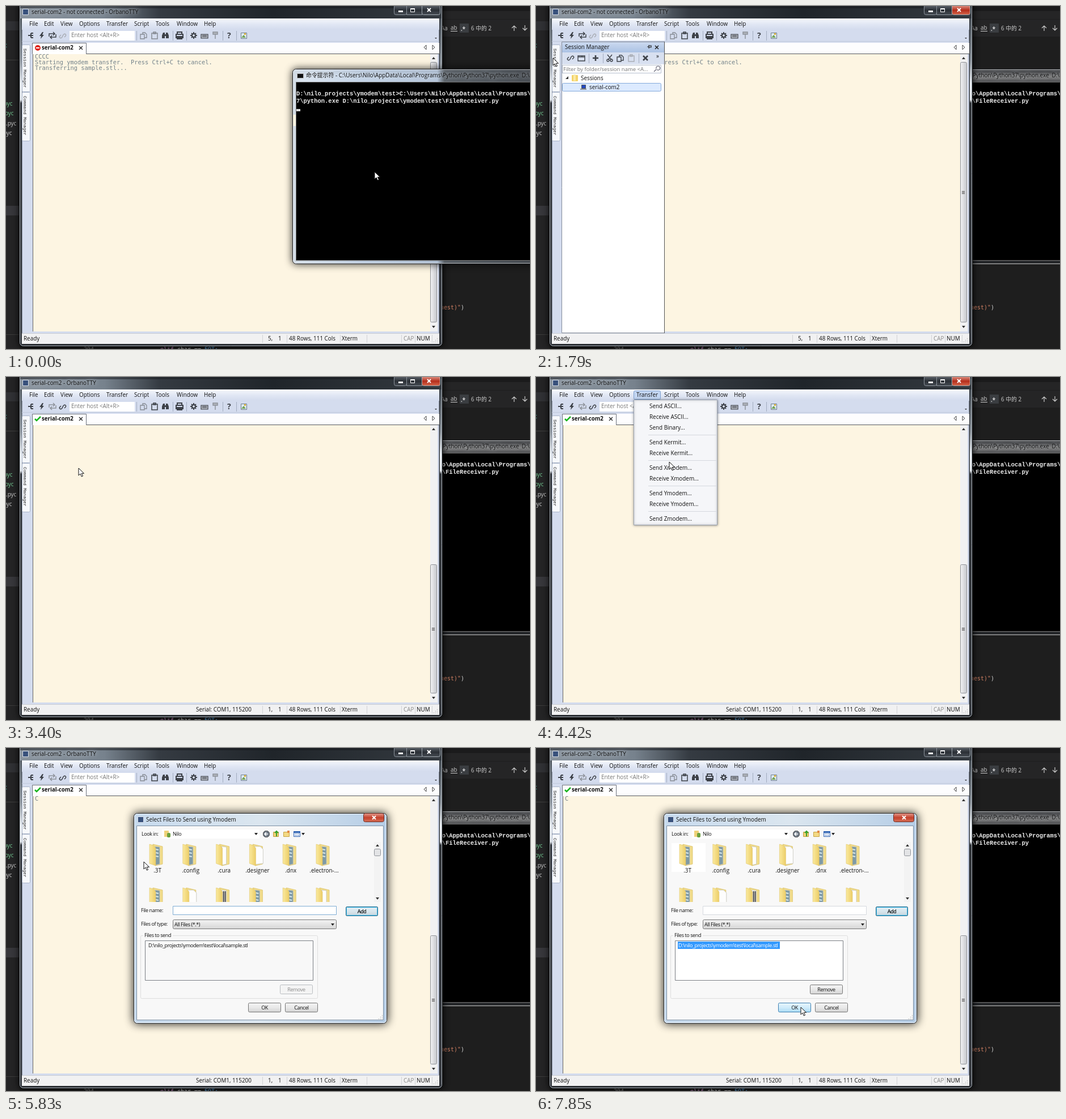
These frames come from a looping animation (924x606 px, 8000 ms). An HTML page with a canvas:

```html
<!DOCTYPE html>
<html lang="en">
<head>
<meta charset="utf-8">
<title>Ymodem transfer</title>
<style>
html, body { margin: 0; width: 100%; height: 100%; overflow: hidden; background: #1e1e1e; }
canvas { display: block; }
</style>
</head>
<body>
<canvas id="stage" width="924" height="606"></canvas>
<script>
const c = document.getElementById('stage').getContext('2d');
const LOOP = 8000, APP = 'OrbanoTTY', USER = 'Nilo';
const PROJECT = 'D:\\nilo_projects\\ymodem\\test';
const PYTHON = `C:\\Users\\${USER}\\AppData\\Local\\Programs\\`;
const UI = '9.9px "Open Sans","Noto Sans CJK SC",sans-serif';
const BOLD = 'bold 9.7px "Open Sans",sans-serif';
const SMALL = '9px "Open Sans",sans-serif';
const MONO = '10.4px "DejaVu Sans Mono",monospace';
const CONSOLE = 'bold 10.45px "Liberation Mono",monospace';
const DARK = '#3d4148', GREY = '#a9adb5';

const ICON = {
  tree: 'M-5 0H0M0-4V4M0-4H4M0 4H4M0 0H4',
  bolt: 'M1-6L-4 1H-1L-2 6L4-1H1L3-6Z',
  loop: 'M-6 2V-3H3M1-6L4-3L1 0M6-2V3H-3M-1 6L-4 3L-1 0',
  link: 'M0-1L2-3A2 2 0 0 1 5 0L3 2M0 1L-2 3A2 2 0 0 1-5 0L-3-2M-1 1L1-1',
  copy: 'M-6-2H1V6H-6ZM-2-2V-5H2L5-2V4H1',
  paste: 'M-5-4H5V6H-5ZM-2-6H2V-3H-2Z',
  find: 'M-6 5V0L-4-5H-1V5ZM6 5V0L4-5H1V5ZM-1-2H1V1H-1Z',
  print: 'M-6-2H6V4H-6ZM-4-2V-6H4V-2M-4 2H4V6H-4Z',
  gear: 'M-3 0a3 3 0 1 0 6 0a3 3 0 1 0-6 0M0-6V-3M0 3V6M-6 0H-3M3 0H6M-4-4L-2-2M4 4L2 2M4-4L2-2M-4 4L-2 2',
  keys: 'M-6-3H6V4H-6ZM-4-1H4M-4 1H4',
  key: 'M-4-6H4V-2H-4ZM0-2V6',
  tab: 'M-6-4H6V5H-6ZM-6-2H6M1-4V-2',
  plus: 'M-5 0H5M0-5V5',
  cut: 'M-4-6L3 3M4-6L-3 3M-5 4a2 2 0 1 0 4 0a2 2 0 1 0-4 0M1 4a2 2 0 1 0 4 0a2 2 0 1 0-4 0',
  cross: 'M-4-4L4 4M4-4L-4 4',
  lens: 'M-2 1a3.5 3.5 0 1 1 2 2L-1 2M-2 2L-6 6',
  up: 'M-3 2L0-2L3 2Z', down: 'M-3-2L0 2L3-2Z', left: 'M2-4L-2 0L2 4Z', right: 'M-2-4L2 0L-2 4Z',
  arrow: 'M0 0V13L3 10L5.3 15L7.5 14L5.2 9.3H9.5Z'
};

// Pointer stops: time, x, y. Each one holds until the next.
const POINTER = [
  [0, 650, 293], [150, 430, 252], [270, 246, 217], [420, 242, 205], [570, 235, 212],
  [690, 150, 170], [810, 80, 122], [930, 36, 92], [1050, 13, 74], [1200, 18, 81],
  [1350, 18, 84], [1500, 30, 92], [1910, 90, 125], [2040, 188, 169], [2190, 82, 150],
  [2320, 107, 149], [2470, 106, 149], [3280, 128, 161], [3640, 140, 115], [3760, 150, 81],
  [3910, 178, 50], [4030, 200, 30], [4300, 215, 90], [4420, 235, 150], [4540, 242, 198],
  [4810, 242, 201], [4960, 243, 201], [6100, 255, 219], [6650, 380, 340], [6800, 360, 347],
  [7100, 360, 347], [7340, 380, 380], [7460, 410, 420], [7580, 430, 446], [7730, 455, 456], [7850, 467, 458]
];

function box(x, y, w, h, fill, stroke, r = 0) {
  c.beginPath();
  if (stroke) c.roundRect(x + .5, y + .5, w - 1, h - 1, r); else c.roundRect(x, y, w, h, r);
  if (fill) { c.fillStyle = fill; c.fill(); }
  if (stroke) { c.strokeStyle = stroke; c.lineWidth = 1; c.stroke(); }
}
function text(s, x, y, color = '#111', font = UI, align = 'left') {
  c.font = font;
  c.letterSpacing = font === SMALL ? '-0.4px' : '0px';
  c.textAlign = align;
  c.fillStyle = color;
  c.fillText(s, x, y);
}
function icon(name, x, y, color = DARK, width = 1.5, fill) {
  const p = new Path2D(ICON[name] || name);
  c.save();
  c.translate(x, y);
  if (fill) { c.fillStyle = fill; c.fill(p); }
  if (width) { c.strokeStyle = color; c.lineWidth = width; c.stroke(p); }
  c.restore();
}
function grad(x0, y0, x1, y1, ...stops) {
  const g = c.createLinearGradient(x0, y0, x1, y1);
  stops.forEach(([at, color]) => g.addColorStop(at, color));
  return g;
}
function withShadow(color, blur, draw) {
  c.save();
  c.shadowColor = color;
  c.shadowBlur = blur;
  draw();
  c.restore();
}
const glowText = (s, x, y) => withShadow('#e8eef4', 7, () => text(s, x, y));
const vline = (x, y, h, color = '#a3adc0') => box(x, y, 1, h, color);

function editor() {
  box(0, 0, 924, 606, '#1e1e1e');
  box(0, 0, 24, 606, '#242425');
  box(0, 27, 24, 16, '#303134');
  box(0, 95, 24, 1, '#404040');
  box(0, 353, 24, 17, '#37373b');
  box(0, 580, 24, 1, '#3c3c3c');
  text('c', -3, 73, '#4ec9b0');
  ['#73c991', '#73c991', '#ccc', '#ccc'].forEach((color, i) =>
    text(['pyc', 'pyc', '.pyc', 'pyc'][i], [-4, -2, 0, -5][i], 176 + i * 17.3, color));

  box(769, 0, 155, 23, '#252526');
  box(769, 0, 155, 9, '#1b1b1c');
  box(769, 24, 155, 30, '#252526');
  box(800, 31, 16, 16, '#3a3d41');
  text('Aa', 767, 43, '#ccc');
  text('ab', 784, 42, '#ccc');
  box(784, 44, 12, 1, '#ccc');
  text('.*', 802, 44, '#ddd', BOLD);
  text('6 中的 2', 820, 43, '#ccc');
  icon('M0 5V-4M-4 0L0-4L4 0', 896, 39, '#ccc', 1.2);
  icon('M0-5V4M-4 0L0 4L4 0', 915, 39, '#ccc', 1.2);

  const code = '10px "DejaVu Sans Mono",monospace';
  text('uest)"', 766, 536, '#ce7e62', code);
  text(')', 802, 536, '#d4d4d4', code);
  text('294', 137, 610, '#858585', code);
  text('elif', 272, 610, '#c586c0', code);
  text('char ==', 302, 610, '#d4d4d4', code);
  text('EOT:', 350, 610, '#569cd6', code);
}

function consoleWindow(front, caret) {
  const glass = front
    ? grad(505, 0, 924, 0, [0, '#dfe8f2'], [.3, '#c3d3e6'], [.61, '#b4c4d8'], [.64, '#596067'], [1, '#474c52'])
    : '#4a4c4f';
  withShadow('rgba(0,0,0,.8)', front ? 14 : 0, () => box(505, 111, 440, 345, glass, '#1a1d21', 6));
  box(506, 112, 440, 343, null, 'rgba(255,255,255,.6)', 5);
  if (front) {
    box(506, 192, 6, 20, '#fdf6e3');
  } else {
    box(506, 116, 418, 18, grad(0, 116, 0, 134, [0, '#3c3d40'], [.5, '#777'], [1, '#4c4d50']));
    box(506, 450, 418, 5, '#26282b');
    box(506, 455, 418, 1, '#c9c9c9');
    box(506, 449, 418, 1, '#999');
  }
  box(513, 119, 12, 9, '#111', '#bbb');
  glowText(`命令提示符 - ${PYTHON}Python\\Python37\\python.exe  ${PROJECT}`, 529, 126);
  box(511, 134, 413, 316, '#000', '#777');
  box(512, 135, 412, 314, '#000');
  text(`${PROJECT}>${PYTHON}`, 512, 158, '#eee', CONSOLE);
  text(`7\\python.exe ${PROJECT}\\FileReceiver.py`, 512, 171, '#eee', CONSOLE);
  if (caret) box(512, 182, 7, 4, '#ddd');
}

function sideTab(label, y, h) {
  box(28, y, 15, h, '#f7f9fc', '#a9b4c8', 2);
  c.save();
  c.translate(31, y + 7);
  c.rotate(Math.PI / 2);
  text(label, 0, 0, '#222', '7.75px "Liberation Mono",monospace');
  c.restore();
}

function mainWindow({ active, connected, t }) {
  withShadow('rgba(0,0,0,.9)', 12, () => box(23, -8, 747, 610, '#2c3036', '#0a0b0c', 6));
  box(24, -8, 745, 609, null, 'rgba(225,232,240,.75)', 6);
  box(25, 0, 743, 22, grad(25, 0, 768, 0, [0, '#8b959f'], [.2, '#77828d'], [.33, '#353b42'], [.6, '#20252a'], [1, '#343a40']));
  box(25, 0, 743, 4, 'rgba(20,22,26,.5)');
  [25, 765].forEach(x => box(x, 22, 3, 575, grad(0, 22, 0, 597,
    [0, '#4a525a'], [.13, '#8b939b'], [.2, '#eef2f6'], [.25, '#e4e8ec'], [.26, '#303439'], [1, '#383c42'])));
  box(29, 5, 11, 11, '#38517c', '#d8dee8');
  glowText(`serial-com2 - ${connected ? '' : 'not connected - '}${APP}`, 45, 14);
  const dim = grad(0, 0, 0, 15, [0, '#555b62'], [.5, '#2b3036'], [1, '#454b52']);
  box(684, -3, 23, 19, dim, '#8b939b', 3);
  box(706, -3, 28, 19, dim, '#8b939b');
  box(733, -3, 33, 19, active ? grad(0, 0, 0, 15, [0, '#d9897a'], [.5, '#b52e1c'], [1, '#d4654a']) : dim, '#a3abb2', 3);
  box(692, 8, 8, 3, '#fff');
  box(713, 4, 8, 7, null, '#fff');
  box(713, 4, 8, 2, '#fff');
  icon('M-3-3L3 3M3-3L-3 3', 746, 7, '#fff', 2);

  box(28, 22, 736, 575, '#d4dcee', '#8a93a3');
  box(28, 22, 736, 20, grad(0, 22, 0, 42, [0, '#f7f9fd'], [.5, '#e1e7f4'], [1, '#d3dbed']));
  if (t >= 4030 && t < 4660) box(172, 24, 48, 16, '#c3d6f2', '#7d9fcd', 2);
  ['File', 41, 'Edit', 67, 'View', 96, 'Options', 129, 'Transfer', 177, 'Script', 226, 'Tools', 264, 'Window', 301, 'Help', 349]
    .forEach((s, i, all) => { if (i % 2 === 0) text(s, all[i + 1], 35); });
  toolbar(connected, t >= 690);

  box(47, 65, 717, 20, '#fdfdfe');
  box(47, 84, 717, 1, '#55585e');
  box(46, 65, 96, 20, '#fff', '#6a6f78');
  box(47, 83, 94, 2, '#fff');
  if (connected) icon('M-5 0L-2 3L5-4', 56, 74, '#19b51f', 2.6);
  else {
    box(51, 69, 10, 10, '#e0261c', null, 5);
    box(53, 73, 6, 2, '#fff');
  }
  text('serial-com2', 63, 77, '#111', BOLD);
  icon('M-3-3L3 3M3-3L-3 3', 132, 74, '#333', 1.5);
  icon('left', 739, 73, '#444', 1);
  icon('right', 754, 73, '#444', 1);
  sideTab('Session Manager', 68, 84);
  sideTab('Command Manager', 152, 87);

  box(47, 85, 701, 490, '#fdf5e2');
  vline(47, 85, 490, '#666');
  if (!connected) {
    ['CCCC', 'Starting ymodem transfer.  Press Ctrl+C to cancel.', 'Transferring sample.stl...']
      .forEach((s, i) => text(s, 51, 93 + i * 10.2, '#72828a', MONO));
  } else if (t >= 5680) text('C', 51, 93, '#72828a', MONO);

  box(748, 85, 13, 490, '#f1f1f2');
  icon('up', 754, 92, '#333', 0, '#333');
  icon('down', 754, 567, '#333', 0, '#333');
  const top = connected ? 331 : 99, mid = (top + 559) / 2;
  box(748, top, 12, 460 - (top - 99), grad(748, 0, 760, 0, [0, '#f5f5f6'], [.5, '#dcdde0'], [1, '#c5c7cb']), '#8f9298', 2);
  for (let i = -1; i < 2; i++) box(751, Math.round(mid) + i * 2, 5, 1, '#555');

  box(28, 578, 736, 19, '#f1f1f2');
  box(28, 578, 736, 1, '#c8ccd4');
  [452, 495, 589, 636, 697, 721, 751].forEach(x => vline(x, 581, 14, '#d0d2d6'));
  text('Ready', 31, 591);
  if (connected) text('Serial: COM1, 115200', 335, 591);
  text(connected ? '1,' : '5,', 462, 591);
  text('1', 480, 591);
  text('48 Rows, 111 Cols', 499, 591);
  text('Xterm', 592, 591);
  text('CAP', 701, 591, '#8b8b8b');
  text('NUM', 724, 591);
  for (let i = 0; i < 3; i++) for (let j = 0; j <= i; j++) box(760 - j * 3, 587 + i * 3, 1, 1, '#999');
}

function toolbar(connected, canPaste) {
  box(28, 62, 736, 1, '#c0c9db');
  icon('tree', 44, 52, DARK, 2);
  icon('bolt', 63, 52, DARK, 0, DARK);
  icon('loop', 82, 52, connected ? '#8d929b' : DARK);
  icon('link', 100, 53, connected ? DARK : GREY);
  box(112, 44, 115, 17, '#fff');
  text('Enter host <Alt+R>', 115, 55, '#777');
  [230, 294, 318, 382, 406].forEach(x => vline(x, 44, 17));
  icon('copy', 243, 52, '#858a93', 1.3);
  icon('paste', 262, 52, canPaste ? DARK : '#858a93');
  icon('find', 281, 52, DARK, 0, DARK);
  icon('print', 306, 52, DARK, 2);
  icon('gear', 331, 52, DARK, 2);
  icon('keys', 350, 53, DARK, 1.2, '#b8bcc4');
  icon('key', 369, 52, '#8d929b', 1.5, '#b0b4bc');
  text('?', 390, 57, DARK, 'bold 14px "Open Sans",sans-serif');
  box(414, 47, 11, 11, '#dbe8f2', '#6f7d8c');
  icon('M-4 4L0-1L4 4Z', 419, 52, '#000', 0, '#76a45a');
  box(420, 48, 3, 3, '#e0b43c');
  icon('M-2-1H2L0 1Z', 758, 57, '#333', 0, '#333');
}

function sessionPanel(width) {
  c.save();
  c.beginPath();
  c.rect(45, 63, width, 515);
  c.clip();
  c.translate(width - 182, 0);
  box(45, 63, 182, 515, '#fff', '#858d9c');
  box(46, 64, 180, 18, grad(0, 64, 0, 82, [0, '#cbd9ef'], [1, '#abc2e4']));
  text('Session Manager', 51, 76);
  icon('M-3 0H0M0-3V3M0-2H4V1H0', 199, 72, '#222', 1.2);
  icon('M-3-3L3 3M3-3L-3 3', 213, 73, '#222');
  box(46, 82, 180, 21, '#d8e0f0');
  ['link', 61, 'tab', 80, 'plus', 105, 'cut', 130, 'copy', 149, 'paste', 168, 'cross', 193].forEach((name, i, all) => {
    if (i % 2 === 0) icon(name, all[i + 1], 92, name === 'paste' ? GREY : DARK, /plus|cross/.test(name) ? 2.6 : 1.4);
  });
  [93, 118, 181].forEach(x => vline(x, 84, 17));
  text('»', 212, 92);
  box(46, 104, 175, 15, '#fff', '#b5bece');
  text('Filter by folder/session name <A...', 48, 115, '#757575', '9.5px "Open Sans",sans-serif');
  icon('lens', 214, 110, '#667', 1.2);
  icon('M2-3V2H-3Z', 55, 127, '#333', 0, '#333');
  box(63, 122, 11, 11, '#f4d46c', null, 1);
  box(66, 121, 4, 11, '#fbeaa6');
  text('Sessions', 79, 131);
  box(46, 136, 175, 15, '#dceaff', '#84a9da', 2);
  box(80, 139, 8, 7, '#2149c4', '#555');
  box(78, 146, 11, 2, '#8a8f98');
  text('serial-com2', 94, 147);
  vline(226, 63, 515, '#555');
  c.restore();
}

function transferMenu(y) {
  withShadow('rgba(0,0,0,.4)', 4, () => box(172, 40, 148, 222, '#f5f6f9', '#9aa2b0'));
  const kinds = [['ASCII', 51], ['Kermit', 115], ['Xmodem', 160], ['Ymodem', 205]];
  if (y > 190) box(174, 196, 144, 18, '#d5e4f8', '#9dbde6', 2);
  kinds.forEach(([kind, at]) => {
    text(`Send ${kind}...`, 200, at + 4);
    text(`Receive ${kind}...`, 200, at + 23);
  });
  text('Send Binary...', 200, 93);
  text('Send Zmodem...', 200, 254);
  [102, 147, 192, 237].forEach(at => box(198, at, 120, 1, '#d5d8de'));
}

function folder(x, y, kind) {
  icon('M-6-19L11-15V16L-2 19Z', x, y, '#dcc36a', .8, '#f1dc8b');
  const page = kind === 'files' ? '#7f9aa5' : '#fdfdfd';
  icon(kind === 'page' ? 'M-7-15H7L12-10V15L-5 17Z' : 'M-2-15L6-14V16L-2 18Z', x, y, '#c5c5bb', .8, page);
  if (kind === 'dark') icon('M1-13V14M4-13V14', x, y, '#444', 2);
  if (kind === 'files') icon('M-1-10L4-9M-1-4L4-3M-1 2L4 3', x, y, '#dcebee', 2);
  icon('M-12-19L-5-17L-1-12V19L-12 15Z', x, y, '#dfc469', .6,
    grad(-12, 0, 0, 0, [0, '#fae99d'], [1, '#ebcb63']));
}

function button(label, x, y, w, style = '') {
  const hot = style === 'hot', off = style === 'off';
  const fill = off ? '#f4f4f4' : hot ? grad(0, y, 0, y + 17, [0, '#e8f6fd'], [.5, '#d0ecfb'], [1, '#a9daf3'])
    : grad(0, y, 0, y + 17, [0, '#f4f4f4'], [.5, '#e9e9e9'], [1, '#d2d2d2']);
  box(x, y, w, 17, fill, off ? '#b8bcc0' : hot ? '#3c7fb1' : '#757575', 2);
  text(label, x + w / 2, y + 12, off ? '#8a8a8a' : '#111', SMALL, 'center');
}

function dialog(t) {
  const picked = t >= 7100;
  withShadow('rgba(0,0,0,.9)', 16, () => box(225, 115, 447, 372, '#bdd3ea', '#22272d', 6));
  box(226, 116, 445, 370, grad(226, 0, 671, 0, [0, '#c6daee'], [.5, '#dbe6ef'], [1, '#b5cde6']), '#f3f8fc', 5);
  box(232, 121, 11, 11, '#38517c', '#d8dee8');
  glowText('Select Files to Send using Ymodem', 247, 130);
  box(630, 115, 37, 16, grad(0, 115, 0, 131, [0, '#e7a195'], [.5, '#c4402b'], [1, '#d8735c']), '#6d2a20', 3);
  icon('M-3-3L3 3M3-3L-3 3', 649, 123, '#fff', 2);
  box(230, 137, 436, 344, '#f8f8f8', '#7c8fa3');

  text('Look in:', 239, 155, '#111', SMALL);
  box(275, 144, 172, 16, '#fff');
  box(279, 146, 8, 11, '#efd27a');
  box(284, 150, 6, 8, '#6ba13f', null, 2);
  text(USER, 294, 155, '#111', SMALL);
  icon('down', 441, 152, '#222', 0, '#222');
  box(453, 146, 12, 12, '#707b88', '#444', 5);
  icon('M3 0H-3M0-3L-3 0L0 3', 459, 152, '#fff', 1.5);
  box(471, 148, 10, 9, '#f0d278', '#bf9c3a');
  icon('M0 5V-4M-3-1L0-4L3-1', 477, 151, '#35a12c', 2);
  box(489, 148, 11, 9, '#f3d983', '#c7a444');
  box(496, 146, 4, 4, '#e38a45');
  box(507, 147, 12, 10, '#fff', '#2d62b3');
  box(507, 147, 12, 3, '#2d62b3');
  for (let i = 0; i < 6; i++) box(509 + i % 3 * 3, 151 + (i / 3 | 0) * 3, 2, 1, '#2d62b3');
  icon('down', 524, 152, '#222', 0, '#222');

  c.save();
  c.beginPath();
  c.rect(239, 166, 424, 106);
  c.clip();
  if (t >= 6100) box(239, 168, 60, 51, '#fff');
  const names = ['.3T', '.config', '.cura', '.designer', '.dnx', '.electron-...'];
  const first = ['files', 'files', 'blank', 'page', 'files', 'files'];
  const second = ['files', 'page', 'dark', 'files', 'files', 'blank'];
  names.forEach((name, i) => {
    const x = 265 + i * 58.8;
    folder(x, 189, first[i]);
    folder(x, 266, second[i]);
    text(name, x + 2, 220, '#111', UI, 'center');
  });
  c.restore();
  box(649, 166, 12, 106, '#f3f3f3');
  icon('up', 655, 172, '#333', 0, '#333');
  icon('down', 655, 266, '#333', 0, '#333');
  box(649, 178, 12, 13, '#e3e4e6', '#8f9298', 2);

  text('File name:', 238, 290, '#111', SMALL);
  box(294, 279, 289, 16, '#fff', picked ? '#d5d9de' : '#7fadd4');
  text('Files of type:', 238, 314, '#111', SMALL);
  box(294, 303, 289, 17, grad(0, 303, 0, 320, [0, '#f4f4f4'], [1, '#d5d5d5']), '#777', 2);
  text('All Files (*.*)', 297, 315, '#111', SMALL);
  icon('down', 576, 312, '#222', 0, '#222');
  button('Add', 599, 280, 57);
  const pulse = .35 + .25 * Math.sin(t / 320);
  box(600, 281, 55, 15, `rgba(150,215,250,${pulse})`, '#34b5e5', 1);
  box(599, 280, 57, 17, null, '#34718f', 2);
  text('Add', 627.5, 292, '#111', SMALL, 'center');

  box(237, 331, 313, 112, null, '#dedede', 2);
  box(242, 325, 52, 12, '#f8f8f8');
  text('Files to send', 244, 334, '#111', SMALL);
  box(245, 340, 297, 71, picked ? '#fff' : '#f8f8f8', '#7b7f85');
  if (picked) box(250, 342, 180, 13, '#3399ff');
  text(`${PROJECT}\\local\\sample.stl`, 251, 352, picked ? '#fff' : '#111', SMALL);
  button('Remove', 483, 418, 58, picked ? '' : 'off');
  button('OK', 427, 450, 58, t >= 7730 ? 'hot' : '');
  button('Cancel', 492, 450, 58);
  for (let i = 0; i < 3; i++) for (let j = 0; j <= i; j++) box(663 - j * 3, 472 + i * 3, 1, 1, '#999');
}

function draw(t) {
  const front = t < 570;
  const state = { active: !front && t < 5550, connected: t >= 3280, t };
  const [, x, y] = POINTER.findLast(stop => stop[0] <= t);
  editor();
  if (front) {
    mainWindow(state);
    consoleWindow(true, t < 420);
  } else {
    consoleWindow(false, false);
    mainWindow(state);
  }
  if (t >= 1650 && t < 3280) sessionPanel(t < 1790 ? 100 : 182);
  if (t >= 4180 && t < 4660) transferMenu(y);
  if (t >= 5830) dialog(t);
  icon('arrow', x, y, '#111', 1, '#fff');
}

const start = performance.now();
function tick() {
  draw((performance.now() - start) % LOOP);
  requestAnimationFrame(tick);
}
tick();
</script>
</body>
</html>
```
